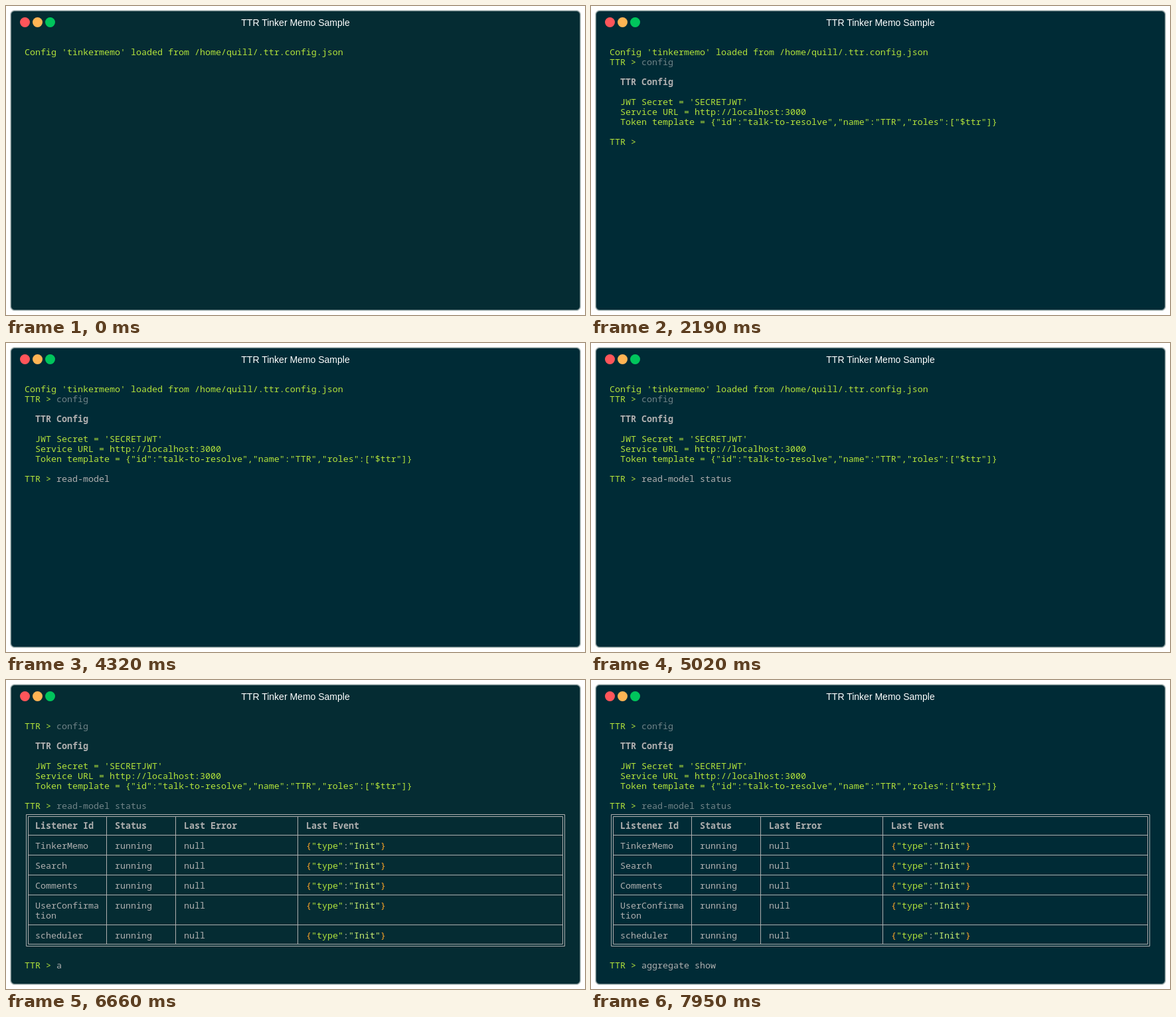
Recreate the animation shown at these times as an HTML page. Size 872 by 465 pixels, loop 8 s.

```html
<!DOCTYPE html>
<html lang="en">
<head>
<meta charset="utf-8">
<title>Terminal session</title>
<style>
  html, body { margin: 0; width: 100%; height: 100%; overflow: hidden; background: #fff; }
  svg { display: block; width: 872px; height: 465px; }
  text { font: 13.333px "Noto Sans Mono", "DejaVu Sans Mono", monospace; white-space: pre; font-variant-ligatures: none; }
  .title { font: 14px "Liberation Sans", Arial, sans-serif; fill: #fff; text-anchor: middle; }
  .bold { font-weight: 700; }
</style>
</head>
<body>
<svg viewBox="0 0 872 465">
  <rect x="6" y="6" width="860" height="453" rx="7" fill="#c3cdcc"/>
  <rect id="win" x="7.5" y="7.5" width="857" height="450" rx="5.5" stroke="#7d9092"/>
  <circle cx="28.5" cy="24.5" r="7.5" fill="#ff555a"/>
  <circle cx="47.5" cy="24.5" r="7.5" fill="#ffb454"/>
  <circle cx="66.5" cy="24.5" r="7.5" fill="#00c55c"/>
  <text class="title" x="436" y="30">TTR Tinker Memo Sample</text>
  <g id="lines"></g>
</svg>
<script>
(() => {
  const LOOP = 8000, CELL = 8, ROW = 15, KEY = 100;
  const FG = '#afafaf', GREEN = '#b3e33b', PALE = '#c8ed71', YELLOW = '#ffa727', DIM = '#708387';
  const SCROLL_AT = 5160;

  const lines = document.getElementById('lines');
  const win = document.getElementById('win');

  function add(parent, tag, attrs) {
    const el = document.createElementNS('http://www.w3.org/2000/svg', tag);
    for (const name in attrs) el.setAttribute(name, attrs[name]);
    return parent.appendChild(el);
  }

  const colX = col => 28 + col * CELL;

  function write(parent, row, col, str, fill, bold) {
    const el = add(parent, 'text', { x: colX(col), y: 74 + row * ROW, fill, class: bold ? 'bold' : '' });
    el.textContent = str;
    return el;
  }

  // Blocks are visible from one time up to another.
  const blocks = [];
  function block(from, to = LOOP) {
    const el = add(lines, 'g', {});
    blocks.push({ el, from, to });
    return el;
  }

  const intro = block(0, SCROLL_AT);
  write(intro, 0, 0, "Config 'tinkermemo' loaded from /home/quill/.ttr.config.json", GREEN);

  const info = block(2190);
  write(info, 3, 2, 'TTR Config', FG, true);
  [
    "JWT Secret = 'SECRETJWT'",
    'Service URL = http://localhost:3000',
    'Token template = {"id":"talk-to-resolve","name":"TTR","roles":["$ttr"]}'
  ].forEach((line, i) => write(info, 5 + i, 2, line, GREEN));

  const table = block(SCROLL_AT);
  const COLS = [2, 17, 30, 53];
  ['Listener Id', 'Status', 'Last Error', 'Last Event']
    .forEach((head, i) => write(table, 11, COLS[i], head, FG, true));

  function listener(row, name) {
    [name, 'running', 'null'].forEach((str, i) => write(table, row, COLS[i], str, FG));
    let col = COLS[3];
    for (const [str, fill] of [['{', YELLOW], ['"type"', GREEN], [':', FG], ['"Init"', PALE], ['}', YELLOW]]) {
      write(table, row, col, str, fill);
      col += str.length;
    }
  }
  listener(13, 'TinkerMemo');
  listener(15, 'Search');
  listener(17, 'Comments');
  listener(19, 'UserConfirma');
  write(table, 20, COLS[0], 'tion', FG);
  listener(22, 'scheduler');

  const ruleY = row => 68.5 + row * ROW;
  const head = ruleY(10), foot = ruleY(23);
  const box = (x, y, r, b) => `M${x} ${y}H${r}V${b}H${x}Z`;
  let rules = box(30.5, head - 1, 841.5, foot + 2) + box(33.5, head + 2, 838.5, foot - 1);
  for (const row of [12, 14, 16, 18, 21]) rules += `M33.5 ${ruleY(row)}H838.5`;
  for (const col of [15, 28, 51]) rules += `M${colX(col) + 3.5} ${head + 2}V${foot - 1}`;
  add(table, 'path', { d: rules, fill: 'none', stroke: FG });

  // Keys fall every KEY ms counted from base; the first one shows at start.
  const prompts = [
    { row: 1, shown: 140, start: 1500, base: 1490, enter: 2090, command: 'config' },
    { row: 9, shown: 2190, start: 3420, base: 3420, enter: 5120, command: 'read-model status' },
    { row: 25, shown: SCROLL_AT, start: 6660, base: 6650, enter: LOOP, command: 'aggregate show' }
  ];
  for (const p of prompts) {
    const line = block(p.shown);
    write(line, p.row, 0, 'TTR >', GREEN);
    p.el = write(line, p.row, 6, '', FG);
  }

  function draw(t) {
    const soft = t < 140 || (t >= SCROLL_AT && t < 7450);
    win.setAttribute('fill', soft ? '#052c33' : '#002b36');
    lines.setAttribute('transform', `translate(0 ${t < SCROLL_AT ? 0 : -ROW})`);
    for (const b of blocks) b.el.style.display = t >= b.from && t < b.to ? '' : 'none';
    for (const p of prompts) {
      const count = t < p.start ? 0 : Math.floor((t - p.base) / KEY) + 1;
      p.el.textContent = p.command.slice(0, count);
      p.el.setAttribute('fill', t < p.enter ? FG : DIM);
    }
  }

  function tick() {
    draw(performance.now() % LOOP);
    requestAnimationFrame(tick);
  }
  tick();
})();
</script>
</body>
</html>
```
